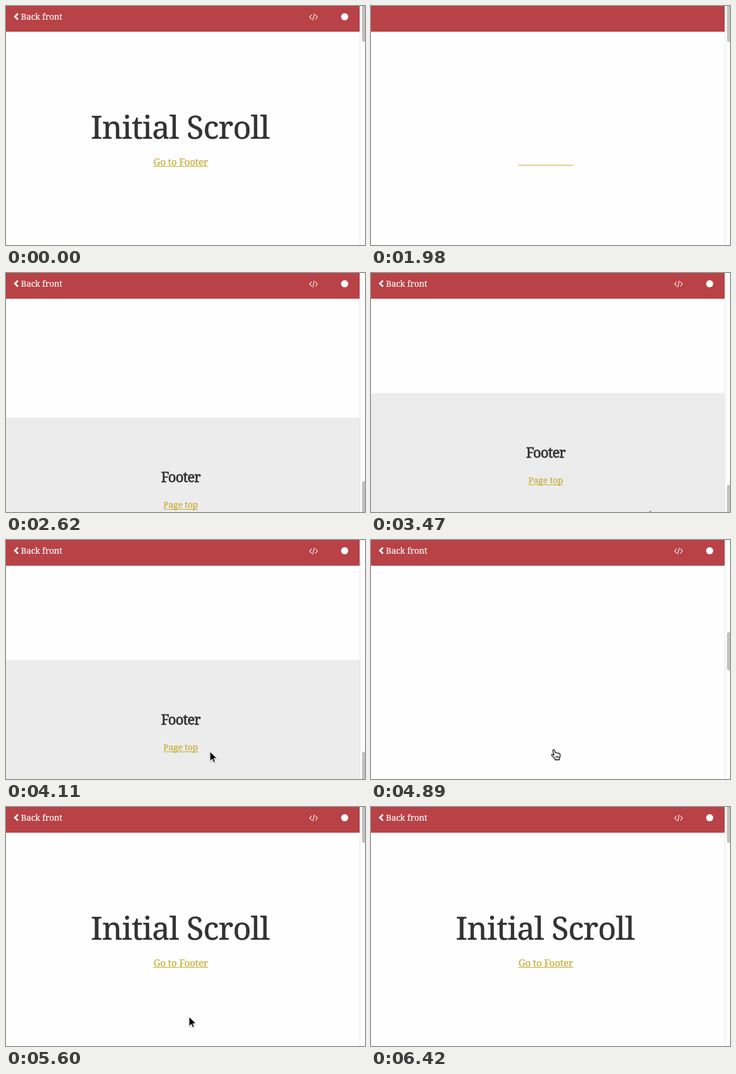
Animation of 600 by 400 pixels, one loop 7800 ms. Source, as an HTML page:

```html
<!DOCTYPE html>
<html lang="en">
<head>
<meta charset="utf-8">
<title>Initial Scroll</title>
<style>
  html, body { margin: 0; width: 100%; height: 100%; overflow: hidden; background: #fefefe; }
  svg { display: block; width: 600px; height: 400px; }
  text { font-family: "Noto Serif", serif; fill: #333; text-anchor: middle; }
  .title { font-size: 53px; letter-spacing: -.8px; stroke: #333; stroke-width: .5px; }
  .heading { font-size: 23px; letter-spacing: -.8px; stroke: #333; stroke-width: .8px; }
  .link { fill: #c3a92c; stroke: #c3a92c; stroke-width: .15px; }
  .go { font-size: 16px; letter-spacing: -.15px; }
  .up { font-size: 14.5px; letter-spacing: -.1px; }
  .back { font-size: 14px; letter-spacing: -.03px; fill: #fff; stroke: #fff; stroke-width: .2px; text-anchor: start; }
  .icon { fill: none; stroke: #fff; }
  .rule { fill: #c3a92c; }
  #arrow, #hand { filter: drop-shadow(0 1px 1px rgba(0, 0, 0, .3)); }
</style>
</head>
<body>
<svg viewBox="0 0 600 400">
  <rect width="600" height="400" fill="#fefefe"/>

  <g id="page">
    <g class="loaded">
      <text class="title" x="291" y="221.5">Initial Scroll</text>
      <text class="link go" x="292" y="267">Go to Footer</text>
      <rect class="rule" x="246" y="268" width="92" height="1"/>
    </g>
    <rect id="bareRule" class="rule" x="246" y="266" width="92" height="1"/>
    <g transform="translate(0 2531)">
      <rect width="591" height="240" fill="#ececec"/>
      <text class="heading" x="292" y="108">Footer</text>
      <text class="link up" x="292" y="151">Page top</text>
      <rect id="topRule" class="rule" x="263" y="153" width="58" height="1"/>
    </g>
  </g>

  <rect width="591" height="43" fill="#b84246"/>
  <g class="loaded">
    <path class="icon" d="M20 12.7L15 17.7L20 22.7" stroke-width="3"/>
    <text class="back" x="25" y="23">Back front</text>
    <path class="icon" d="M511 14.5L507.5 18.5L511 22.5M517 14.5L520.5 18.5L517 22.5M515.3 13L512.7 24" stroke-width="1.1"/>
    <circle cx="566" cy="18" r="6" fill="#fff"/>
  </g>

  <rect x="591" width="9" height="400" fill="#fcfcfc"/>
  <rect x="591" width="1" height="400" fill="#e8e8e8"/>
  <rect id="thumb" x="595" width="8" height="64" rx="3" fill="#c1c1c1"/>

  <g id="cursor">
    <path id="arrow" d="M0 0V16L3.7 12.6L6 18L8.6 16.9L6.3 11.6H11.4Z" stroke="#fff"/>
    <g id="hand" transform="translate(-5 -1)" stroke="#000" stroke-linejoin="round">
      <path fill="#fff" stroke-width="1.2" d="M3.2 3C2.4 .9 5.2 .2 5.9 2.1L7.4 6.3C8 5.4 9.7 5.6 10 6.7C10.7 5.9 12.2 6.3 12.5 7.4C13.4 6.8 14.8 7.4 15 9C15.3 11.6 14.8 13 13.8 15V17.6H6.6V16C5 13.8 3 12.4 1.4 10.8C.2 9.2 1.8 7.9 3.2 9L4.9 10.2Z"/>
      <path d="M8 11.2l.3 3.6M10 11.2l.2 3.6M12 11.2v3.6" stroke-width=".9"/>
    </g>
  </g>
</svg>
<script>
  const LOOP = 7800, SCROLL_MAX = 2330, SCROLL_TIME = 926, THUMB_RATIO = 0.154;
  const $ = id => document.getElementById(id);
  const loaded = document.querySelectorAll('.loaded');
  const show = (el, on) => { el.style.display = on ? '' : 'none'; };

  // time, x, y of the pointer's hot spot
  const pointer = [
    [3470, 466, 397], [3700, 426, 376], [3900, 383, 361], [4110, 341, 354],
    [4250, 314, 354], [4300, 312, 353], [4580, 306, 351], [5950, 306, 351],
    [6100, 305, 358], [6250, 302, 373], [6420, 297, 400]
  ];

  function easeOutQuint(t, start) {
    const p = Math.min(1, Math.max(0, (t - start) / SCROLL_TIME));
    return 1 - (1 - p) ** 5;
  }

  function pointerAt(t) {
    const i = Math.max(1, pointer.findIndex(k => k[0] > t));
    const [t0, x0, y0] = pointer[i - 1], [t1, x1, y1] = pointer[i];
    const p = (t - t0) / (t1 - t0);
    return [x0 + (x1 - x0) * p, y0 + (y1 - y0) * p];
  }

  function draw(t) {
    const scroll = Math.round(SCROLL_MAX * (easeOutQuint(t, 2107) - easeOutQuint(t, 4751)));
    $('page').setAttribute('transform', `translate(0 ${-scroll})`);
    $('thumb').setAttribute('y', scroll * THUMB_RATIO - 4);

    const blank = t >= 1980 && t < 2030;
    loaded.forEach(el => show(el, !blank));
    show($('bareRule'), blank);

    const visible = t >= 3470 && t < 6420;
    show($('cursor'), visible);
    if (visible) {
      const [x, y] = pointerAt(t).map(Math.round);
      $('cursor').setAttribute('transform', `translate(${x} ${y})`);
    }
    const hand = t >= 4230 && t < 5600;
    show($('hand'), hand);
    show($('arrow'), !hand);
    show($('topRule'), !hand);
  }

  function frame() {
    draw(performance.now() % LOOP);
    requestAnimationFrame(frame);
  }
  frame();
</script>
</body>
</html>
```
